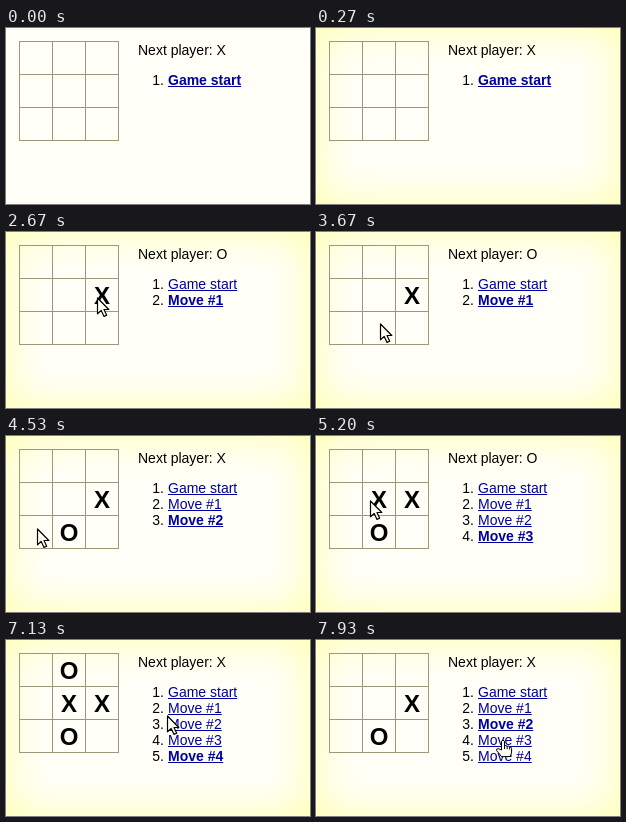
An HTML page that plays this animation: 304 by 176 pixels, repeating every 8 s.

```html
<!DOCTYPE html>
<html lang="en">
<head>
<meta charset="utf-8">
<title>Tic-tac-toe with history</title>
<style>
  html, body { margin: 0; width: 100%; height: 100%; overflow: hidden; }
  body { background: #fffff8; }
  #stage { position: relative; width: 304px; height: 176px; overflow: hidden;
    font: 14px/16px "Liberation Sans", Arial, sans-serif; color: #000; }
  #glow { position: absolute; inset: 0; box-shadow: inset 0 0 44px #ffffac; }
  svg { position: absolute; left: 0; top: 0; }
  #board text { font: bold 24px "Liberation Sans", Arial, sans-serif; text-anchor: middle; }
  #status { position: absolute; left: 132px; top: 14px; white-space: nowrap; }
  .move { position: absolute; left: 122px; height: 16px; white-space: nowrap; }
  .num { position: absolute; left: 0; top: 0; width: 36px; text-align: right; }
  .link { position: absolute; left: 40px; top: 0; color: #0000a0; text-decoration: underline; }
</style>
</head>
<body>
<div id="stage">
  <div id="glow"></div>
  <svg id="board" width="304" height="176">
    <path id="grid" stroke="#99997c" fill="none"/>
    <g id="marks"></g>
  </svg>
  <div id="status"></div>
  <div id="list"></div>
  <svg width="304" height="176">
    <g id="cursor" fill="#fffff0" stroke="#000" stroke-linejoin="round">
      <path id="arrow" stroke-width="1.2" d="M.5 0V15.8L4.2 12.4 7 18.4 9.7 17.2 7 11.5H11.8Z"/>
      <g id="hand">
        <path d="M-1.5 10V1.2Q0 -.8 1.5 1.2V6Q3 4.8 4.2 6.4Q5.6 5.4 6.6 7Q8.4 6.4 8.6 8.6V12Q8.4 14 7 16.6H-1.6Q-3 14.4 -6.4 10.6Q-6.8 8.4 -4.6 8.6Z"/>
        <path d="M1.5 6V9M4.2 6.4V9.2M6.6 7V9.4" fill="none"/>
      </g>
    </g>
  </svg>
</div>
<script>
const LOOP = 8000, STEP = 200 / 3;
const CELL = 33, ROW = 16, LIST_TOP = 44, LINK_LEFT = 162;
const $ = id => document.getElementById(id);

// Played squares in order, with the time of each click
const moves = [
  { at: 2670, cell: 5 },
  { at: 4070, cell: 7 },
  { at: 5130, cell: 4 },
  { at: 6400, cell: 1 }
];
const jump = { at: 7470, step: 2 };

// The pointer rests between glides
const entry = { at: 1330, x: 280, y: 162 };
const glides = [
  { from: 1270, to: 1630, x: 168, y: 92 },
  { from: 1800, to: 1870, x: 147, y: 91 },
  { from: 1870, to: 2470, x: 91, y: 66 },
  { from: 3000, to: 3800, x: 62, y: 94 },
  { from: 4270, to: 4600, x: 27, y: 93 },
  { from: 4600, to: 5000, x: 54, y: 65 },
  { from: 5270, to: 5970, x: 58, y: 23 },
  { from: 6670, to: 7300, x: 184, y: 87 },
  { from: 7800, to: 7930, x: 187, y: 100 }
];

let lines = "";
for (let i = 0; i < 4; i++) {
  const p = 13.5 + CELL * i;
  lines += `M13 ${p}H113M${p} 13V113`;
}
$("grid").setAttribute("d", lines);

const rows = Array.from({ length: moves.length + 1 }, (_, i) => {
  const row = document.createElement("div");
  row.className = "move";
  row.style.top = LIST_TOP + ROW * i + "px";
  row.innerHTML = `<span class="num">${i + 1}.</span><span class="link">${i ? "Move #" + i : "Game start"}</span>`;
  $("list").append(row);
  return row;
});

const marks = moves.map(({ cell }, i) => {
  const mark = document.createElementNS("http://www.w3.org/2000/svg", "text");
  mark.setAttribute("x", 30 + CELL * (cell % 3));
  mark.setAttribute("y", 39 + CELL * Math.floor(cell / 3));
  mark.textContent = "XO"[i % 2];
  $("marks").append(mark);
  return mark;
});

const show = (el, on) => { el.style.display = on ? "" : "none"; };
const smooth = k => k * k * (3 - 2 * k);

function pointerAt(t) {
  let { x, y } = entry;
  for (const g of glides) {
    const k = smooth(Math.min(1, Math.max(0, (t - g.from) / (g.to - g.from))));
    x += (g.x - x) * k;
    y += (g.y - y) * k;
  }
  return [Math.round(x), Math.round(y)];
}

function render(time) {
  // The screen updates fifteen times a second
  const tick = Math.floor((time % LOOP + 5) / STEP);
  const t = Math.round(tick * STEP / 10) * 10;

  $("glow").style.opacity = Math.min(1, tick / 4);

  const played = moves.filter(m => t >= m.at).length;
  const current = t >= jump.at ? jump.step : played;
  $("status").textContent = "Next player: " + "XO"[current % 2];
  marks.forEach((mark, i) => show(mark, i < current));
  rows.forEach((row, i) => {
    show(row, i <= played);
    row.lastChild.style.fontWeight = i === current ? "bold" : "normal";
  });

  const [x, y] = pointerAt(t);
  const overLink = x >= LINK_LEFT && x < 217 && y >= LIST_TOP && y < LIST_TOP + ROW * (played + 1) && played > 0;
  show($("cursor"), t >= entry.at);
  $("cursor").setAttribute("transform", `translate(${x} ${y})`);
  show($("arrow"), !overLink);
  show($("hand"), overLink);
}

let start;
function loop(now) {
  start ??= now;
  render(now - start);
  requestAnimationFrame(loop);
}
render(0);
requestAnimationFrame(loop);
</script>
</body>
</html>
```
